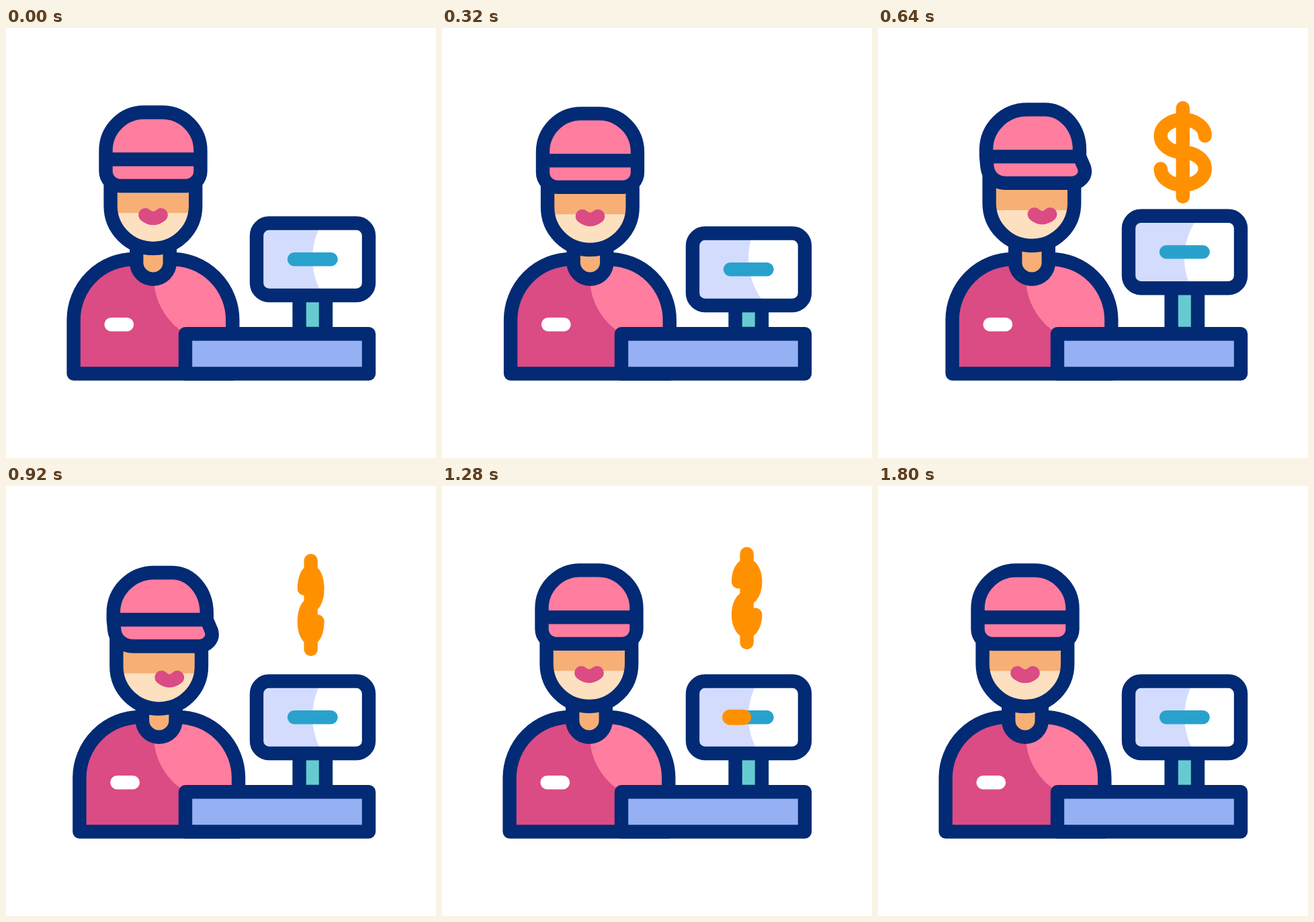
These frames come from a looping animation (640x640 px, 2.04 s). An HTML page:

```html
<!DOCTYPE html>
<html lang="en">
<head>
<meta charset="utf-8">
<title>Cashier</title>
<style>
  html, body { margin: 0; width: 100%; height: 100%; overflow: hidden; background: #fff; }
  svg { display: block; width: 100vw; height: 100vh; }
  .line { stroke: #032a74; stroke-width: 20.4; stroke-linejoin: round; }
  .round { stroke-width: 20.4; stroke-linecap: round; }
  .hollow { fill: none; }
</style>
</head>
<body>
<svg viewBox="0 0 640 640" xmlns="http://www.w3.org/2000/svg">
  <defs>
    <path id="torso" d="M100.6 514.5V434.5A90.5 90.5 0 0 1 191.1 344H246.8A90.5 90.5 0 0 1 337.3 434.5V514.5Z"/>
    <path id="face" d="M155.6 225V264.8A63.3 63.3 0 0 0 282.2 264.8V225Z"/>
    <rect id="panel" x="373" y="290.5" width="167" height="107.5" rx="18.5"/>
    <clipPath id="torsoClip"><use class="lean" href="#torso"/></clipPath>
    <clipPath id="faceClip"><use href="#face"/></clipPath>
    <clipPath id="panelClip"><use class="bounce" href="#panel"/></clipPath>
    <clipPath id="aboveClip"><rect width="640" height="345"/></clipPath>
  </defs>

  <use class="lean" href="#torso" fill="#db4b84"/>
  <circle cx="316" cy="372" r="96" fill="#ff7d9f" clip-path="url(#torsoClip)"/>
  <g class="lean">
    <use href="#torso" class="line hollow"/>
    <path d="M156.6 441.2H180" class="round" stroke="#fff"/>
    <path d="M194.2 320V349A24.8 24.8 0 0 0 243.8 349V320" class="line" fill="#f7af76"/>
  </g>

  <g id="head">
    <use href="#face" fill="#f7af76"/>
    <rect x="150" y="275.3" width="140" height="60" fill="#fce0bf" clip-path="url(#faceClip)"/>
    <path id="lips" d="M207.3 278.3Q219 288 230.7 278.3" class="round hollow" stroke="#db4b84"/>
    <use href="#face" class="line hollow"/>
    <path id="cap" class="line" fill="#ff7d9f"/>
    <path id="band" class="line"/>
  </g>

  <g clip-path="url(#aboveClip)">
    <path id="dollar" class="round hollow" stroke="#ff9100" stroke-linejoin="round"/>
  </g>

  <path d="M436.6 380V455H476V380" class="line" fill="#66cbd0"/>
  <use class="bounce" href="#panel" fill="#d3dcfd"/>
  <circle cx="559" cy="343" r="103" fill="#fff" clip-path="url(#panelClip)"/>
  <g class="bounce">
    <use href="#panel" class="line hollow"/>
    <path d="M429 344.2H483.6" class="round" stroke="#28a2cd"/>
    <path id="progress" class="round" stroke="#ff9100" style="stroke-width:23"/>
  </g>
  <rect x="267" y="455.2" width="273" height="59.3" class="line" fill="#95b1f3"/>
</svg>

<script>
const LOOP = 2040, STEP = 40, LAST = 1800;
const el = id => document.getElementById(id);
const span = (t, a, b) => Math.min(1, Math.max(0, (t - a) / (b - a)));
const ease = (t, a, b) => { const k = span(t, a, b); return k * k * (3 - 2 * k); };

// Rises to 1 from `on`, falls back to 0 from `off`.
const hold = (t, on, off, length) => ease(t, on, on + length) - ease(t, off, off + length);
// A single swell from 0 to 1 and back.
const swell = (t, a, b) => Math.sin(Math.PI * span(t, a, b)) ** 2;
// The head ducks, then hops, each time the body swings over.
const nod = (t, from) => 7 * swell(t, from, from + 400) - 4.2 * swell(t, from + 310, from + 470);

// The cap is symmetric from the front; turning pushes its brim out to the right.
function drawCap(turn) {
  const left = 148.5 + 2.5 * turn, right = 289.5 + 0.5 * turn;
  const top = 125.5, band = 195.5, base = 235;
  const spring = 182.5 + 3 * turn, rise = spring - top;
  const flat = 205.5 + 6 * turn, flatEnd = flat + 27;
  el('cap').setAttribute('d',
    `M${left} ${band}V${spring}A${flat - left} ${rise} 0 0 1 ${flat} ${top}` +
    `H${flatEnd}A${right - flatEnd} ${rise} 0 0 1 ${right} ${spring}V${band}` +
    `L${right + 7 * turn} ${213 - turn}` +
    `C${right + 11 * turn} 225 ${280 + 10 * turn} ${base} ${267.5 + 10 * turn} ${base}` +
    `H${170.5 + 10 * turn}` +
    `C${158 + 7 * turn} ${base} ${left + 3 * turn} 225 ${left + 1.5 * turn} ${213 - 2 * turn}Z`);
  el('band').setAttribute('d', `M${left} ${band}H${right}`);
}

function drawDollar(t) {
  const dollar = el('dollar');
  const shown = t >= 360 && t < 1720;
  dollar.style.display = shown ? '' : 'none';
  if (!shown) return;
  const spin = Math.cos(2 * Math.PI * span(t, 645, 1568));
  const below = 195 * (1 - span(t, 360, 560)) ** 2;
  const cx = 453.7, cy = 185 + (640 - t) / 35.5 + below;
  const at = (x, y) => `${cx + 33 * spin * x} ${cy + 24.4 * y} `;
  const k = 0.5523;
  dollar.setAttribute('d',
    `M${cx} ${cy - 66}V${cy + 66}M${at(1, -1)}` +
    `C${at(1, -1 - k)}${at(k, -2)}${at(0, -2)}` +
    `S${at(-1, -1 - k)}${at(-1, -1)}` +
    `S${at(-k, 0)}${at(0, 0)}` +
    `S${at(1, 1 - k)}${at(1, 1)}` +
    `S${at(k, 2)}${at(0, 2)}` +
    `S${at(-1, 1 + k)}${at(-1, 1)}`);
}

function drawProgress(t) {
  const head = ease(t, 1150, 1470), tail = ease(t, 1370, 1690);
  const x = k => 428.7 + 55 * k;
  el('progress').setAttribute('d', head > tail ? `M${x(tail)} 344.2H${x(head)}` : '');
}

function shift(selector, x, y) {
  document.querySelectorAll(selector).forEach(n => n.setAttribute('transform', `translate(${x} ${y})`));
}

function render(t) {
  const lean = 10 * hold(t, 220, 830, 410);
  const turn = hold(t, 325, 915, 285);
  shift('.lean', lean, 0);
  shift('#head', lean, nod(t, 250) + nod(t, 820));
  shift('#lips', 15.5 * turn, 3.2 * turn);
  shift('.bounce', 0, 15 * swell(t, 100, 540) - 10.8 * swell(t, 500, 780));
  drawCap(turn);
  drawDollar(t);
  drawProgress(t);
}

const start = performance.now();
function tick() {
  const t = (performance.now() - start) % LOOP;
  render(Math.min(LAST, Math.floor(t / STEP) * STEP));
  requestAnimationFrame(tick);
}
tick();
</script>
</body>
</html>
```
